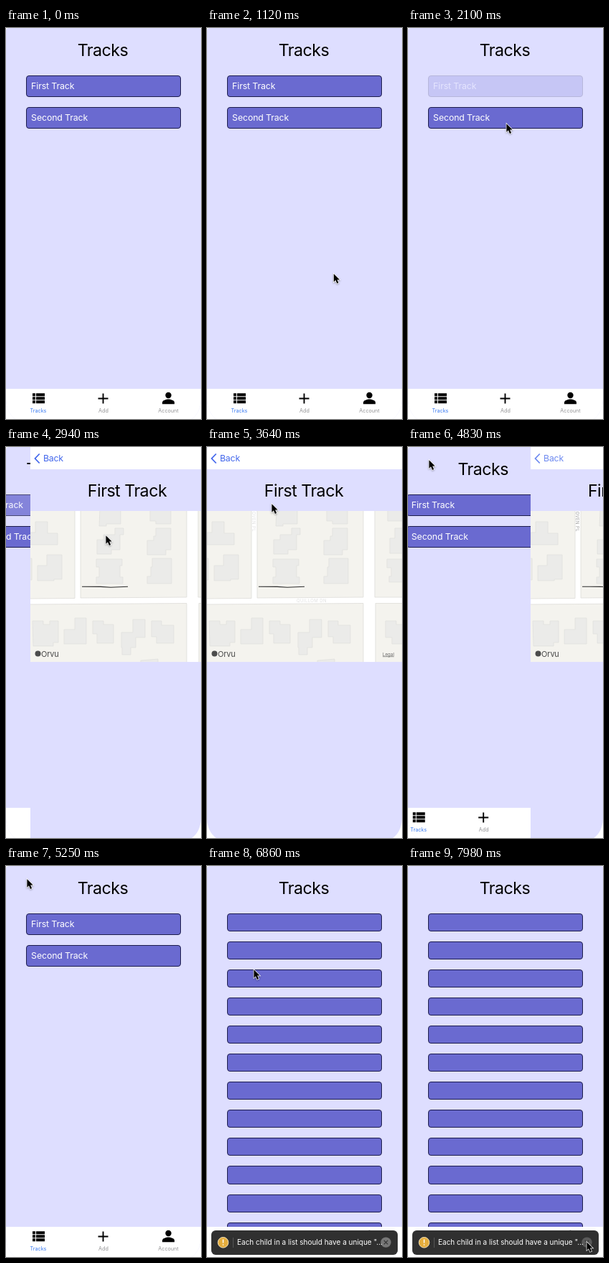
Animation, 272 px wide and 544 px high, one loop 8000 ms. Source, as an HTML page:

```html
<!DOCTYPE html>
<html lang="en">
<head>
<meta charset="utf-8">
<title>Tracks</title>
<style>
html, body { margin: 0; width: 100%; height: 100%; overflow: hidden; }
body { font-family: Inter, Roboto, sans-serif; }
#stage { position: relative; width: 272px; height: 544px; overflow: hidden;
  clip-path: path("M4 0H269Q272 0 272 3V517Q271 536 259 544H13Q1 536 0 517V4Q0 0 4 0z"); }
.page { position: absolute; inset: 0; background: #dedeff; overflow: hidden; }
.page > *, .tabs > *, .toast > * { position: absolute; }
h1 { margin: 0; left: -1px; width: 272px; text-align: center; line-height: 30px;
  font-weight: 400; font-size: 23.2px; letter-spacing: -.5px; }
.rows { inset: 65.6px 28px 42px 27.6px; overflow: hidden; }
.row { box-sizing: border-box; height: 30.4px; margin-bottom: 14px; padding-left: 6.5px;
  border: 1px solid #1d1d4c; border-radius: 4px; background: #6a6ad0; color: #fff;
  font-size: 12.3px; letter-spacing: -.1px; line-height: 28.4px; }
.empty .row { height: 25.1px; }
.tabs { left: 0; top: 502px; width: 272px; height: 42px; background: #fff; }
.tabs span { top: 25.7px; width: 60px; text-align: center; font-size: 7.2px; line-height: 10px; color: #929294; }
.tabs .on { color: #3577f0; }
.bar { left: 0; top: 0; width: 272px; height: 31px; background: #fff; }
.back { left: 0; top: 0; color: #4468ec; font-size: 12.3px; letter-spacing: -.2px; line-height: 32px; }
.back span { position: absolute; left: 18px; }
.back svg { position: absolute; left: 0; top: 0; }
.map { left: 0; top: 89px; }
.toast { left: 6px; top: 507px; width: 260px; height: 34px; border-radius: 6px; background: #303030; color: #fff; }
.toast span { left: 36px; top: 0; font-size: 10px; line-height: 33px; white-space: nowrap; }
#cursor { position: absolute; left: 0; top: 0; filter: drop-shadow(0 1px 1px #0005); }
</style>
</head>
<body>
<div id="stage">
  <div class="page" id="list">
    <h1 style="top:16px">Tracks</h1>
    <div class="rows" id="named">
      <div class="row" id="first">First Track</div>
      <div class="row">Second Track</div>
    </div>
    <div class="rows empty" id="blank"></div>
    <div class="tabs">
      <svg width="272" height="42">
        <path d="M37 6.2h4v4h-4zm5 0h12v4h-12zm-5 5h4v4h-4zm5 0h12v4h-12zm-5 5h4v4h-4zm5 0h12v4h-12z"/>
        <path d="M135.5 6.5v14m-7-7h14" stroke="#000" stroke-width="1.9"/>
        <circle cx="226.5" cy="9" r="4.2"/>
        <path d="M218 21.3v-2.2c0-3 5.5-4.5 8.5-4.5s8.5 1.5 8.5 4.5v2.2z"/>
      </svg>
      <span class="on" style="left:15px">Tracks</span>
      <span style="left:106px">Add</span>
      <span style="left:196.5px">Account</span>
    </div>
    <div class="toast" id="toast">
      <svg width="260" height="34">
        <circle cx="16.5" cy="16.8" r="7.3" fill="#e5ad3d" stroke="#f3e3bd"/>
        <path d="M16.5 12.5v5m0 1.8v1.5" stroke="#fff" stroke-width="1.4"/>
        <path d="M30.5 10v14" stroke="#555"/>
        <g id="close">
          <circle cx="243.5" cy="16.6" r="7.2" fill="#777"/>
          <path d="M240.8 13.9l5.4 5.4m0-5.4l-5.4 5.4" stroke="#303030" stroke-width="1.1"/>
        </g>
      </svg>
      <span>Each child in a list should have a unique "...</span>
    </div>
  </div>

  <div class="page" id="detail">
    <div class="bar"></div>
    <div class="back" id="back">
      <svg width="18" height="32"><path d="M12.7 9.5L6.5 16l6.2 6.5" fill="none" stroke="#4468ec" stroke-width="1.8"/></svg>
      <span>Back</span>
    </div>
    <h1 style="top:46px">First Track</h1>
    <svg class="map" width="272" height="210" viewBox="0 89 272 210">
      <path fill="#fff" d="M0 89h272v210H0z"/>
      <g fill="#f4f3ee" stroke="#dddcd9" stroke-width=".8">
        <path d="M-2 87H62V210.500L-2 211zM70 87H218V209L70 210zM234 87H274V209H234zM-2 219L218 217.500V301H-2zM235 217.500H274V301H235z"/>
      </g>
      <g fill="#ebebe9" stroke="#dededb" stroke-width=".7" stroke-linejoin="round">
        <path d="M7 104H24V120H38V136H0V119H7zM23 150H44V184H33V186H10V165H23zM-2 155H2V185H-2z"/>
        <path d="M97 86H126V107H106V110H96zM118 113H130V122H125V143H113V149H93V129H102V122H118zM92 156H128V165H125V181H129V190H92V181H96V167H92z"/>
        <path d="M167 86H196V107H175V103H167zM175 113H196V143H189V150H163V130H172V124H175zM170 155H197V190H163V180H168V167H170z"/>
        <path d="M252 86H274V103H252zM262 113H274V148H255V127H262zM251 156H274V188H254V180H257V168H251z"/>
        <path d="M3 242H18V247H27V242H39V272H32V277H4zM62 238H78V274H47V254H62zM87 242H102V247H116V273H93V260H87zM143 240H160V265H147V279H140V289H128V279H127V258H143zM169 242H183V248H200V273H176V264H169zM154 297L178 295V301H154zM249 242H264V247H274V274H258V265H249z"/>
      </g>
      <path d="M72 194.200L98 194.400L112 195.200L136 194.200" fill="none" stroke="#2c2c2c" stroke-width="1.100"/>
      <g id="roads" fill="#9b9b9b" font-size="6" letter-spacing=".4">
        <text x="146" y="216" text-anchor="middle">QUILLOM DN</text>
        <text transform="translate(63 118) rotate(90)" text-anchor="end">TOVEN PL</text>
      </g>
      <circle cx="10.5" cy="287.5" r="4" fill="#4c4c4c"/>
      <text x="15" y="291.5" font-size="11" fill="#4c4c4c" letter-spacing="-.2">Orvu</text>
      <text x="245" y="290.5" font-size="6.2" fill="#666" text-decoration="underline">Legal</text>
    </svg>
  </div>

  <svg id="cursor" width="16" height="21" viewBox="-3 -4 20 26">
    <path d="M0 0V14.200L3.200 11.200L5.700 17L8.300 15.900L5.900 10.300H10.300z" stroke="#fff" stroke-width="1.800" paint-order="stroke"/>
  </svg>
</div>
<script>
const LOOP = 8000, TICK = 70, WIDTH = 272;
const $ = id => document.getElementById(id);

// Pointer path: time, x, y
const path = [
  [70, 40, 2], [280, 118, 150], [560, 222, 400], [700, 262, 532], [840, 222, 503],
  [1190, 165, 300], [1470, 121, 130], [1680, 133, 84], [1750, 98, 58], [1820, 98, 58],
  [1890, 108, 74], [2100, 137, 132], [2310, 137, 132], [2660, 139, 122], [3430, 139, 122],
  [3640, 90, 78], [4200, 32, 24], [4270, 29, 17], [6300, 29, 17], [6860, 65, 143],
  [7140, 184, 367], [7420, 246, 495], [7630, 258, 523], [7840, 249, 522], [8000, 249, 522]
];

for (let i = 0; i < 12; i++) {
  $('blank').appendChild(document.createElement('div')).className = 'row';
}

const ramp = (t, a, b) => Math.min(1, Math.max(0, (t - a) / (b - a)));

// Critically damped spring from 0 to 1
function spring(t, start) {
  const u = Math.max(0, t - start) * 0.0195;
  return u > 9.5 ? 1 : 1 - (1 + u) * Math.exp(-u);
}

function pointer(t) {
  const i = Math.max(1, path.findIndex(p => p[0] >= t));
  const [a, b] = [path[i - 1], path[i]];
  const k = ramp(t, a[0], b[0]);
  return [a[1] + (b[1] - a[1]) * k, a[2] + (b[2] - a[2]) * k];
}

const slide = (id, x, y = 0) => { $(id).style.transform = `translate(${x}px,${y}px)`; };
const fade = (id, v) => { $(id).style.opacity = v; };
const show = (id, on) => { $(id).style.display = on ? '' : 'none'; };

function draw(t) {
  const open = spring(t, 2755) - spring(t, 4720.6);
  slide('list', -0.3 * WIDTH * open);
  slide('detail', WIDTH * (1 - open));

  fade('first', 1 - 0.8 * (ramp(t, 1820, 2030) - ramp(t, 2760, 3010)));
  fade('back', 1 - 0.7 * (ramp(t, 4410, 4620) - ramp(t, 4690, 4900)));
  fade('roads', ramp(t, 3430, 4130));
  fade('close', 1 - 0.4 * ramp(t, 7770, 7910));

  const reloaded = t >= 6230;
  show('named', !reloaded);
  show('blank', reloaded);
  show('toast', reloaded);

  show('cursor', t >= 70);
  const [x, y] = pointer(t);
  slide('cursor', x - 2, y - 2);
}

const begin = performance.now();
function frame() {
  const t = (performance.now() - begin) % LOOP;
  draw(Math.floor(t / TICK) * TICK);
  requestAnimationFrame(frame);
}
frame();
</script>
</body>
</html>
```
